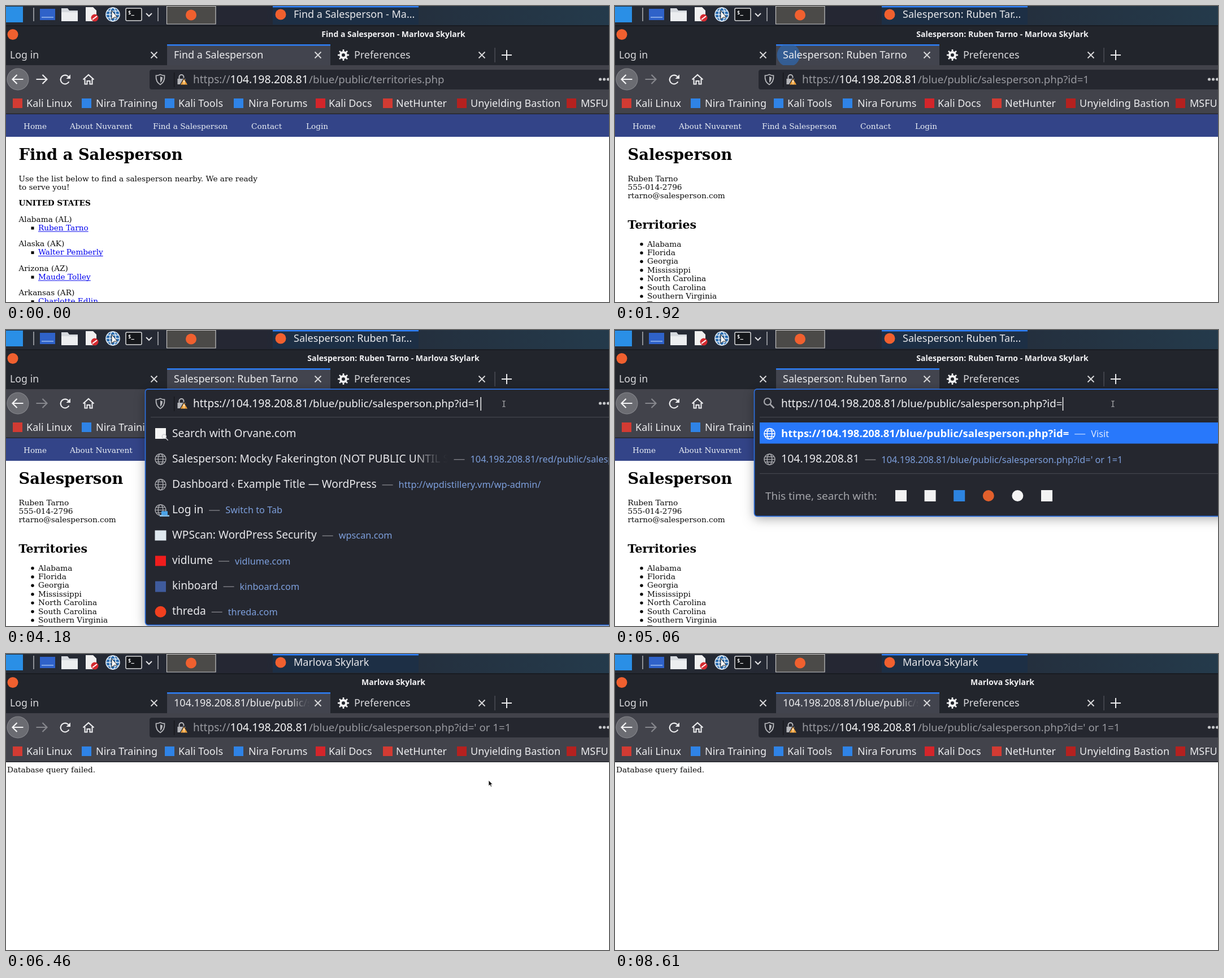
Write an HTML page with a canvas that moves like this. It is 1067 by 525 pixels and loops after 8940 ms.

```html
<!DOCTYPE html>
<html lang="en">
<head>
<meta charset="utf-8">
<title>Browser session</title>
<style>
html, body { margin: 0; width: 100%; height: 100%; overflow: hidden; background: #fff; }
canvas { display: block; width: 1067px; height: 525px; }
</style>
</head>
<body>
<canvas id="stage" width="1067" height="525"></canvas>
<script>
const c = document.getElementById('stage').getContext('2d');
const LOOP = 8940, STEP = 70, TAU = Math.PI * 2;
const UI = '"Noto Sans", sans-serif', SERIF = '"DejaVu Serif", serif';
const BLUE = '#2d7ff9', FIELD = '#25272f', BAR = '#42434b', LIGHT = '#e9e9ec', FLAME = '#f0602f';
const PERSON = 'Ruben Tarno', BROWSER = 'Marlova Skylark', IP = '104.198.208.81';

// Times of the hard changes, in ms
const LOAD = [1850, 6460], BURST = [1905, 6515], BURST_TIME = 375;
const FOCUS = 3570, OPEN = 3710, DESELECT = 4050, CARET_OFF = 4840, ERASE = 5060, QUOTE = 5310, LEAVE = 6390;

// ---- drawing helpers ----
function text(s, x, y, size, color, font = UI, weight = '', align = 'left') {
  c.font = `${weight} ${size}px ${font}`;
  c.textAlign = align;
  c.fillStyle = color;
  c.fillText(s, x, y);
  return x + c.measureText(s).width;
}
function rect(x, y, w, h, color) { c.fillStyle = color; c.fillRect(x, y, w, h); }
function disc(x, y, r, color) {
  c.beginPath(); c.arc(x, y, r, 0, TAU);
  c.fillStyle = color; c.fill();
}
function rounded(x, y, w, h, r, fill, stroke, lw = 1.5) {
  c.beginPath(); c.roundRect(x, y, w, h, r);
  if (fill) { c.fillStyle = fill; c.fill(); }
  if (stroke) { c.strokeStyle = stroke; c.lineWidth = lw; c.stroke(); }
}
function path(d, stroke, lw = 2, fill) {
  const p = new Path2D(d);
  if (fill) { c.fillStyle = fill; c.fill(p); }
  if (stroke) { c.strokeStyle = stroke; c.lineWidth = lw; c.stroke(p); }
}
function at(x, y, draw) { c.save(); c.translate(x, y); draw(); c.restore(); }
function fade(x0, x1, color) {
  const g = c.createLinearGradient(x0, 0, x1, 0);
  g.addColorStop(0, color);
  g.addColorStop(1, 'rgba(66,67,75,0)');
  return g;
}
function globe(x, y, r, color) {
  at(x, y, () => {
    c.strokeStyle = color; c.lineWidth = 1.5;
    for (const rx of [r, r * 0.45]) {
      c.beginPath(); c.ellipse(0, 0, rx, r, 0, 0, TAU); c.stroke();
    }
    path(`M${-r} 0H${r}M${-r * .85} ${-r * .5}H${r * .85}M${-r * .85} ${r * .5}H${r * .85}`, color, 1.3);
  });
}
const cross = x => at(x, 87, () => path('M-5.5 -5.5L5.5 5.5M5.5 -5.5L-5.5 5.5', '#d8d8da', 1.9));

// ---- desktop panel and window title ----
function panel(task) {
  const g = c.createLinearGradient(0, 0, 1067, 0);
  g.addColorStop(0, '#262b34'); g.addColorStop(0.42, '#242733'); g.addColorStop(1, '#243a4b');
  rect(0, 0, 1067, 35, g);
  rect(0, 1, 30, 28, '#2a8fe6');
  rect(48, 3, 2, 24, '#8d9096');
  rect(268, 3, 2, 24, '#8d9096');
  rect(60, 5, 27, 20, '#2f62c9');
  path('M63 20H84', '#9dbdf0', 1.5);
  path('M98 4H109L112 8H127V27H98Z', null, 0, '#d5d9de');
  rect(98, 11, 29, 16, '#eceef0');
  path('M141 2H154L160 8V27H141Z', null, 0, '#f0f0f0');
  disc(157, 21, 6.5, '#d42a30');
  path('M153 24L161 18', '#fff', 2);
  disc(189, 15, 12.5, '#2a6cb0');
  globe(189, 15, 12, '#e3edf6');
  path('M187 8V24L191 20L197 20Z', '#222', 1, '#fff');
  rounded(212, 4, 28, 22, 2, '#15171b', '#d9dadc', 1.5);
  text('$_', 216, 15, 9, '#fff', '"Noto Sans Mono", monospace', 'bold');
  path('M248 13L253 18L258 13', '#e3e3e5', 2);
  rounded(284.5, 0.5, 86.5, 31.5, 0, '#4b4a48', '#c4c4c4', 1.2);
  disc(327.5, 16, 9.5, FLAME);
  rect(378, 0, 84, 34, '#252733');
  rect(472, 0, 258, 33, '#1d2f45');
  rect(472, 0, 258, 2.5, BLUE);
  disc(486, 15, 9.5, FLAME);
  text(task, 509, 21, 18, LIGHT);
}
function titleBar(title) {
  rect(0, 34, 1067, 72, '#22252c');
  rect(0, 34, 1067, 2, '#191c22');
  disc(12, 50.5, 9.5, FLAME);
  text(title, 685.5, 55, 14, '#f2f2f4', UI, 'bold', 'center');
}

// ---- tabs and toolbars ----
function gear(x, y) {
  at(x, y, () => {
    c.strokeStyle = '#f0f0f1'; c.lineWidth = 4;
    c.beginPath(); c.arc(0, 0, 5, 0, TAU); c.stroke();
    for (let i = 0; i < 8; i++) { c.rotate(TAU / 8); path('M0 -6V-10', '#f0f0f1', 2.6); }
  });
}
// A disc spreads from the icon place over the whole tab while it fades.
function tabBurst(t) {
  const start = BURST.find(b => t >= b && t < b + BURST_TIME);
  if (start === undefined) return;
  const p = (t - start) / BURST_TIME;
  c.save();
  c.beginPath(); c.rect(285, 69, 289, 36); c.clip();
  c.globalAlpha = 0.75 * (1 - p);
  disc(307, 87, 8 + 290 * p, '#2f67ae');
  c.restore();
}
function tabs(label, t) {
  text('Log in', 7, 93, 17.8, '#d9d9dc');
  cross(262);
  rect(285, 69, 289, 37, '#42444e');
  rect(285, 68, 289, 2.5, BLUE);
  tabBurst(t);
  c.save();
  c.beginPath(); c.rect(290, 70, 246, 34); c.clip();
  text(label, 297, 93, 18, label.startsWith(IP) ? fade(505, 545, '#ececee') : '#ececee');
  c.restore();
  cross(552);
  gear(597, 87);
  text('Preferences', 616, 93, 17.9, '#d9d9dc');
  cross(842);
  rect(864.5, 74, 1.2, 26, '#55575e');
  path('M877 87H895M886 78V96', '#ececee', 2);
}
function arrow(x, dir, color) {
  at(x, 130, () => {
    c.scale(dir, 1);
    path('M-9.5 0H9.5M1.5 -8L9.5 0L1.5 8', color, 2.2);
  });
}
function navButtons(forward) {
  rect(0, 105, 1067, 87, BAR);
  disc(21, 130, 19.5, '#85868b');
  disc(21, 130, 18.5, '#6b6c72');
  arrow(21, -1, '#f4f4f5');
  arrow(63, 1, forward ? '#ececee' : '#86878d');
  at(104.5, 130.5, () => {
    c.strokeStyle = '#ececee'; c.lineWidth = 2.2;
    c.beginPath(); c.arc(0, 0, 7.8, 0.5, TAU - 0.75); c.stroke();
    path('M9.5 -9V-1.5H2Z', null, 0, '#ececee');
  });
  path('M136.5 130.5L146 122L155.5 130.5M139.5 129V138.5H143.5V133H148.5V138.5H152.5V129', '#ececee', 2.1);
}
const BOOKMARKS = [
  [12, 36, 'Kali Linux', '#d23b33'], [134, 159, 'Nira Training', '#2f83e6'],
  [281, 305, 'Kali Tools', '#2f83e6'], [403, 429, 'Nira Forums', '#2f83e6'],
  [548, 571, 'Kali Docs', '#d4252a'], [667, 690, 'NetHunter', '#d23b33'],
  [798, 822, 'Unyielding Bastion', '#b5211f'], [992, 1017, 'MSFU', '#b5211f']
];
function bookmarks() {
  for (const [ix, tx, label, color] of BOOKMARKS) {
    rect(ix, 164, 17, 17, color);
    text(label, tx, 178.5, 18, '#ececee');
  }
  rect(0, 190.5, 1067, 1.5, '#24262c');
}

// ---- address field ----
function siteIcons() {
  path('M273 121.5C276 123 278 123.5 280.5 123.5C281 131 279 136 273 139.5C267 136 265 131 265.5 123.5C268 123.5 270 123 273 121.5Z', '#b6b7bb', 1.8);
  path('M273 125V136C276 134 277 130 277 126.5Z', null, 0, '#b6b7bb');
  rect(297, 118, 1.2, 26, '#15161a');
  path('M306.5 129V126A4 4 0 0 1 314.5 126V129', '#b6b7bb', 2);
  rect(303.5, 129, 14, 10, '#b6b7bb');
  path('M315 128L322 140H308Z', FIELD, 1.2, '#f0a23c');
  path('M315 132V136M315 137.2V138.5', '#fff', 1.5);
}
function address(x, rest, dim, bright) {
  text('https://', x, 137, 19, dim);
  text(IP, x + 65.5, 137, 19.5, bright);
  return text(rest, x + 205, 137, 18.7, dim);
}
function dots() { for (const x of [1051.5, 1058.5, 1065.5]) disc(x, 130, 2.6, '#c4c5c8'); }
function magnifier(x, y, s, color) {
  at(x, y, () => {
    c.scale(s, s);
    c.strokeStyle = color; c.lineWidth = 2.2;
    c.beginPath(); c.arc(-2, -2, 6, 0, TAU); c.stroke();
    path('M2.5 2.5L9.5 9.5', color, 2.6);
  });
}
function box(h) {
  c.save();
  c.shadowColor = 'rgba(0,0,0,.35)'; c.shadowBlur = 20; c.shadowOffsetY = 4;
  rounded(246.5, 104.8, 860, h, 5, FIELD);
  c.restore();
  rounded(246.5, 104.8, 860, h, 5, null, '#2c6fe0', 1.7);
}
const caret = x => rect(x, 119, 1.4, 24, '#fff');
const listRule = y => rect(256, y, 811, 1.2, '#44464e');

// ---- suggestion lists ----
function side(end, y, s, color, dash = '#85868c') {
  rect(end + 10, y + 1, 19, 1.3, dash);
  text(s, end + 39, y + 7, 16.3, color);
}
const GREY = '#a5a6ab', LINK = '#7d9fdc';
const ROWS = [
  ['Search with Orvane.com', '', () => { rect(264, 174, 19, 19, '#f4f4f4'); magnifier(281, 190, 0.6, '#c9cacd'); }],
  ['Salesperson: Mocky Fakerington (NOT PUBLIC UNTIL S', IP + '/red/public/salesperson.php', y => globe(273.5, y + 1, 9.5, GREY)],
  ['Dashboard ‹ Example Title — WordPress', 'http://wpdistillery.vm/wp-admin/', y => globe(273.5, y + 1, 9.5, GREY)],
  ['Log in', 'Switch to Tab', y => {
    globe(273.5, y + 1, 9.5, GREY);
    rect(275, y + 3, 11, 7, '#4aa3e8'); rect(272, y + 10, 17, 2.5, '#8cc8f5');
  }],
  ['WPScan: WordPress Security', 'wpscan.com', y => rect(263.5, y - 8, 20, 18, '#dfe8ef')],
  ['vidlume', 'vidlume.com', y => rect(264, y - 8, 19, 18, '#f01d1d')],
  ['kinboard', 'kinboard.com', y => rect(264, y - 8, 19, 19, '#3f5b9c')],
  ['threda', 'threda.com', y => disc(273.5, y + 1, 10, '#f2401f')]
];
function historyList() {
  listRule(154);
  ROWS.forEach(([label, url, icon], i) => {
    const y = 183 + 45.1 * i, cut = i === 1;
    icon(y);
    c.save();
    if (cut) { c.beginPath(); c.rect(290, y - 20, 492, 40); c.clip(); }
    const end = text(label, 294, y + 6.5, 19.2, cut ? fade(725, 784, LIGHT) : LIGHT);
    c.restore();
    if (url) side(cut ? 782.5 : end, y, url, LINK);
  });
}
const ENGINES = ['#f3f3f3', '#f3f3f3', '#2d84e0', '#e2602c', '#f3f3f3', '#f3f3f3'];
function matchList(url, hover) {
  listRule(154);
  rect(256, 164, 811, 37.5, '#2878fb');
  globe(273.5, 184, 9.5, '#fff');
  side(text(url, 294, 189.5, 18.5, '#fff', UI, 'bold'), 183, 'Visit', '#dfeaff', '#b9d3ff');
  if (hover) rect(256, 209, 811, 38, '#373943');
  globe(273.5, 229.5, 9.5, GREY);
  side(text(IP, 294, 234.5, 19.5, LIGHT), 228.5, IP + "/blue/public/salesperson.php?id=' or 1=1", LINK);
  listRule(254);
  text('This time, search with:', 266, 300.5, 18.9, '#a4a5aa');
  ENGINES.forEach((color, i) => {
    const x = 506 + 51.6 * i;
    if (i === 3 || i === 4) disc(x, 294, 10, color);
    else rect(x - 10, 284, 20, 20, color);
  });
}

// ---- web pages ----
const body = (s, x, y, color = '#0b0b0b', weight) => text(s, x, y, 13.65, color, SERIF, weight);
function siteNav() {
  rect(0, 192, 1067, 40, '#334488');
  [[31, 'Home'], [113, 'About Nuvarent'], [260, 'Find a Salesperson'], [434, 'Contact'], [531, 'Login']]
    .forEach(([x, s]) => body(s, x, 217.5, '#e9eef4'));
}
function listPage() {
  siteNav();
  text('Find a Salesperson', 22.5, 273, 27.3, '#000', SERIF, 'bold');
  body('Use the list below to find a salesperson nearby. We are ready', 22.5, 310.5);
  body('to serve you!', 22.5, 326);
  body('UNITED STATES', 22.5, 354, '#000', 'bold');
  [['Alabama (AL)', PERSON], ['Alaska (AK)', 'Walter Pemberly'],
   ['Arizona (AZ)', 'Maude Tolley'], ['Arkansas (AR)', 'Charlotte Edlin']]
    .forEach(([state, name], i) => {
      const y = 382.5 + 43.5 * i;
      body(state, 22.5, y);
      rect(44.5, y + 9, 5, 5, '#000');
      const end = body(name, 57, y + 15.4, '#0000ee');
      rect(57, y + 17, end - 57, 1, '#0000ee');
    });
}
function personPage() {
  siteNav();
  text('Salesperson', 22.5, 273, 27.3, '#000', SERIF, 'bold');
  [PERSON, '555-014-2796', 'rtarno@salesperson.com'].forEach((s, i) => body(s, 22.5, 310.5 + 15.4 * i));
  text('Territories', 22.5, 394.5, 20.48, '#000', SERIF, 'bold');
  ['Alabama', 'Florida', 'Georgia', 'Mississippi', 'North Carolina', 'South Carolina', 'Southern Virginia', 'Tennessee']
    .forEach((s, i) => {
      const y = 426.5 + 15.4 * i;
      disc(47, y - 4, 2.7, '#000');
      body(s, 57, y);
    });
}
function errorPage() { body('Database query failed.', 2, 209.5); }

const PAGES = [
  { task: 'Find a Salesperson - Ma...', title: `Find a Salesperson - ${BROWSER}`, tab: 'Find a Salesperson',
    path: '/blue/public/territories.php', draw: listPage },
  { task: 'Salesperson: Ruben Tar...', title: `Salesperson: ${PERSON} - ${BROWSER}`, tab: `Salesperson: ${PERSON}`,
    path: '/blue/public/salesperson.php?id=1', draw: personPage },
  { task: BROWSER, title: BROWSER, tab: IP + '/blue/public/salesperson',
    path: "/blue/public/salesperson.php?id=' or 1=1", draw: errorPage }
];

// ---- pointer: each move is a quadratic curve from a through b to d ----
const smooth = p => p * p * (3 - 2 * p), slowDown = p => p * (2 - p), speedUp = p => p * p;
const MOVES = [
  { t0: 130, t1: 1030, a: [1195, 575], b: [600, 335], d: [101, 377], ease: slowDown },
  { t0: 1030, t1: 1240, a: [101, 377], b: [100, 384], d: [99, 391], ease: smooth },
  { t0: 2590, t1: 3500, a: [99, 393], b: [650, -4], d: [881, 131], ease: smooth },
  { t0: 5850, t1: 6250, a: [881, 131], b: [890, 172], d: [854, 224], ease: smooth },
  { t0: 6870, t1: 7220, a: [854, 224], b: [500, 308], d: [161, 197], ease: smooth },
  { t0: 7220, t1: 7780, a: [161, 197], b: [52, 206], d: [91.5, 202], ease: smooth },
  { t0: 7840, t1: 8610, a: [91.5, 202], b: [662, 390], d: [1233, 578], ease: speedUp }
];
function pointer(t) {
  if (t < 200 || t >= 8610) return null;
  const { t0, t1, a, b, d, ease } = MOVES.findLast(m => t >= m.t0);
  const s = ease(Math.min(1, Math.floor((t - t0) / STEP) * STEP / (t1 - t0)));
  const [x, y] = [0, 1].map(i => a[i] * (1 - s) ** 2 + 2 * b[i] * s * (1 - s) + d[i] * s * s);
  return { x, y };
}
const CLICKS = [1640, FOCUS, DESELECT, 6250], CLICK_TIME = 130;
function drawPointer({ x, y }, t, page) {
  if (CLICKS.some(k => t >= k && t < k + CLICK_TIME)) disc(x, y, 6.7, '#a8a51b');
  const inField = y > 113 && y < 150 && x > 330;
  const overText = page === 1 && x < 146 && y > 376 && y < 400 || page === 2 && x < 158 && y > 195 && y < 213;
  at(x, y, () => {
    if (inField || overText)
      path('M-2.5 -5H-.5L0 -4.5L.5 -5H2.5M0 -4.5V4.5M-2.5 5H-.5L0 4.5L.5 5H2.5', inField ? '#d6d6d8' : '#555', 1);
    else if (page === 0 && t >= 1030)
      path('M-1 0H1V5L5 6V10L3 13H-2L-4 8L-1 8Z', '#111', 1, '#fff');
    else
      path('M0 0V10L2.3 8L4 11.5L5.6 10.7L4 7.3H7Z', '#fff', 0.7, '#111');
  });
}

// ---- scene ----
function draw(t) {
  const page = LOAD.filter(k => t >= k).length;
  const p = PAGES[page], pos = pointer(t);
  const focus = t >= FOCUS && t < LEAVE;
  const typing = focus && t >= ERASE;
  rect(0, 0, 1067, 525, '#fff');
  panel(p.task);
  titleBar(p.title);
  tabs(p.tab, t);
  navButtons(page === 0);
  bookmarks();
  p.draw();

  if (!focus) {
    rounded(254, 113, 830, 35, 4, FIELD);
    siteIcons();
    address(331, t >= LEAVE ? PAGES[2].path : p.path, '#98999f', '#f5f5f6');
  } else if (typing) {
    const tail = '/blue/public/salesperson.php?id=' + (t >= QUOTE ? "'" : '');
    box(225.5);
    magnifier(272, 129, 1, '#a5a6ab');
    caret(address(294, tail, '#f2f2f4', '#f2f2f4') + 0.5);
    matchList('https://' + IP + tail, pos && pos.y > 209);
  } else {
    const open = t >= OPEN, selected = open && t < DESELECT;
    box(open ? 418.5 : 50);
    siteIcons();
    if (selected) rect(331, 119, 509, 24, '#2878fb');
    const end = address(331, p.path, '#f2f2f4', '#f2f2f4');
    if (!selected && t < CARET_OFF) caret(end + 0.5);
    if (open) historyList();
  }
  if (!typing) dots();
  if (pos) drawPointer(pos, t, page);
}
function tick() {
  draw(performance.now() % LOOP);
  requestAnimationFrame(tick);
}
tick();
</script>
</body>
</html>
```
